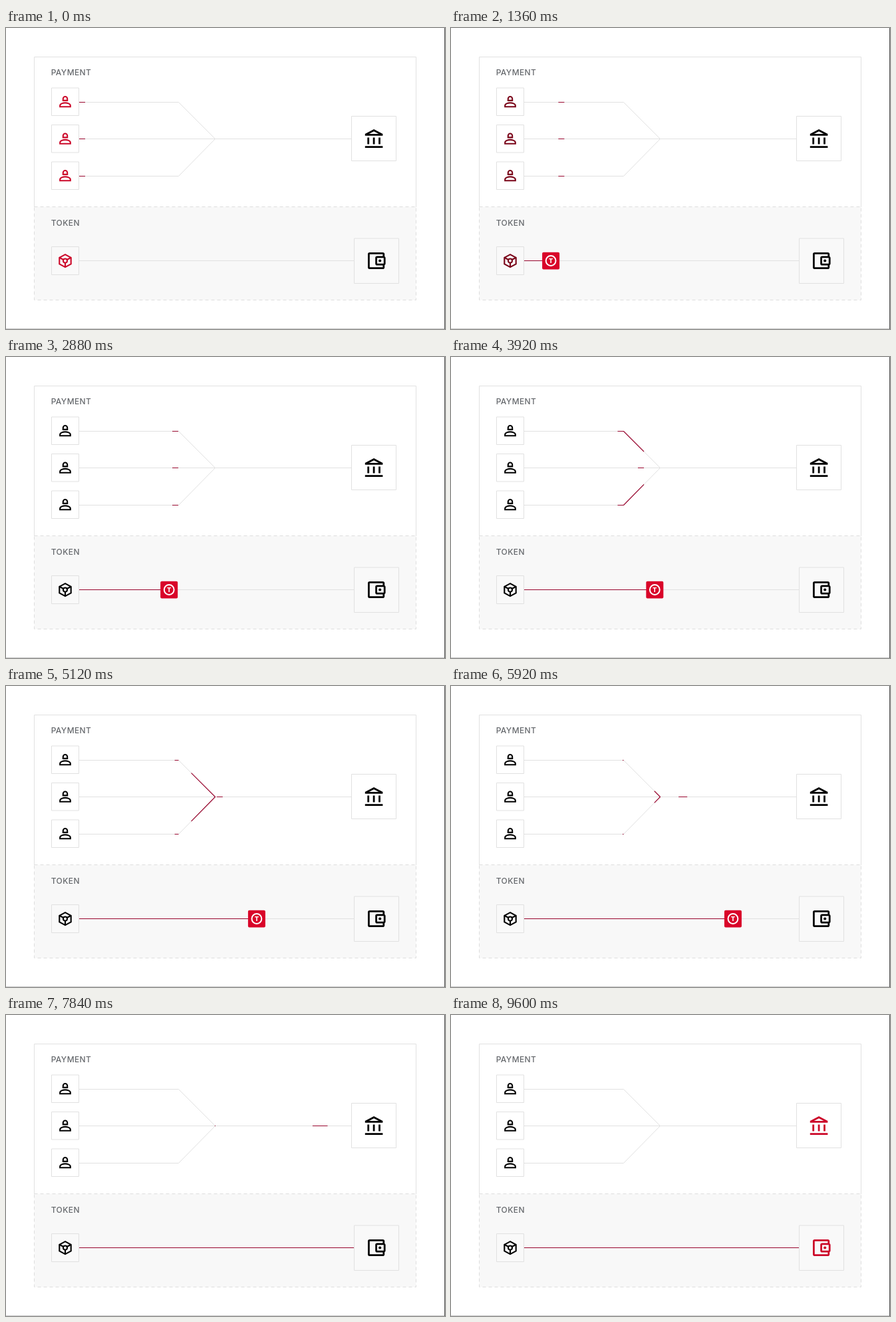
An HTML page that plays this animation: 660x452 px, repeating every 9680 ms.

```html
<!DOCTYPE html>
<html lang="en">
<head>
<meta charset="utf-8">
<title>Payment and token flow</title>
<style>
  html, body { margin: 0; width: 100%; height: 100%; overflow: hidden; background: #fff; }
  svg { display: block; }
  text { font-family: Inter, Arial, sans-serif; }
  .label { font-size: 12px; font-weight: 500; letter-spacing: .4px; fill: #66696d; }
  .wire { fill: none; stroke: #e1e1e1; }
  .box { fill: #fff; stroke: #e1e1e1; }
  .tint { fill: #f8f8f8; }
  .pulse { fill: none; stroke: #98062e; stroke-width: 1.2; }
  .outline { fill: none; stroke: currentColor; stroke-width: 2.1; }
  .solid { fill: currentColor; }
</style>
</head>
<body>
<svg width="660" height="452" viewBox="0 0 660 452">
  <defs>
    <g id="person" class="outline">
      <path d="M-3.2 -2.1V-4.8a3.2 3.2 0 0 1 6.4 0V-2.1Z"/>
      <path d="M-7.8 7.3V5.4C-7.8 2.6-3 1.4 0 1.4S7.8 2.6 7.8 5.4V7.3Z"/>
    </g>
  </defs>

  <path d="M659.5 0V452" stroke="#555"/>
  <path d="M0 451.5H659" stroke="#ccc"/>
  <path class="wire" d="M42.5 269V43.5H616.5V269"/>
  <rect class="tint" x="42.5" y="268.5" width="574" height="140" stroke="#dedede" stroke-dasharray="5 4"/>
  <text class="label" x="67.7" y="70.7">PAYMENT</text>
  <text class="label" x="67.7" y="296.7">TOKEN</text>

  <path class="wire" d="M110 111.5H259.5L314.5 166.5L259.5 222.5H110M110 166.5H519M110 349.5H523"/>
  <path id="pulses" class="pulse"/>
  <path id="trail" class="pulse"/>
  <g id="chip">
    <rect x="-13" y="-12.7" width="26" height="25.6" rx="2" fill="#d90429"/>
    <circle r="7.4" fill="none" stroke="#fff" stroke-width="2"/>
    <text y="3.5" font-size="9.5" font-weight="800" text-anchor="middle" fill="#fff">T</text>
  </g>

  <g class="box">
    <path d="M68.5 90h41v41.5h-41zM68.5 145.5h41v41.5h-41zM68.5 201h41v41.5h-41z"/>
    <path d="M519.5 132.5h67v67h-67z"/>
  </g>
  <path class="box" style="fill:#f9f9f9" d="M68.5 328.5h41v42h-41zM523.5 316h67v67.5h-67z"/>

  <g id="senders">
    <use href="#person" x="89" y="111"/>
    <use href="#person" x="89" y="166.5"/>
    <use href="#person" x="89" y="222"/>
    <g class="outline" transform="translate(89 349.5)">
      <path d="M0-9.4L8.7-4.7V4.9L0 9.6L-8.7 4.9V-4.7Z"/>
      <circle r="3"/>
      <path d="M-8.7-4.7L-2.6-1.5M8.7-4.7L2.6-1.5M0 3V9.6"/>
    </g>
  </g>
  <g id="receivers" class="solid" fill-rule="evenodd">
    <path transform="translate(537 150.6) scale(1.4)" d="M4.5 10h2v7h-2zM10.5 10h2v7h-2zM16.5 10h2v7h-2zM2 19h19v2H2zM11.5 1L2 6v2h19V6zM11.5 3.26L16.7 6H6.3z"/>
    <g transform="translate(539.8 332.7) scale(1.4)">
      <path d="M21 7.28V5a2 2 0 0 0-2-2H5a2 2 0 0 0-2 2v14a2 2 0 0 0 2 2h14a2 2 0 0 0 2-2v-2.28A2 2 0 0 0 22 15V9a2 2 0 0 0-1-1.72zM20 9v6h-7V9zM5 19V5h14v2h-6a2 2 0 0 0-2 2v6a2 2 0 0 0 2 2h6v2z"/>
      <circle cx="16" cy="12" r="1.5"/>
    </g>
  </g>
</svg>
<script>
const LOOP = 9680, START = 480, TURN = 2880, LEAVE = 4560, MERGE = 5120;
const BEND = 259.5, JOIN = 314.5, MID = 166.5;
const el = id => document.getElementById(id);
const clamp = k => Math.max(0, Math.min(1, k));
const progress = (t, from, to) => clamp((t - from) / (to - from));
const mix = (a, b, k) => a + (b - a) * k;

// Red at k = 1, black at k = 0.
const tone = k => `rgb(${204 * k},${8 * k},${41 * k})`;

// The pulse runs evenly to the bend, slows on the slope, then speeds up.
function frontX(t) {
  if (t < TURN) return mix(119, 259, progress(t, START, TURN));
  const late = Math.max(0, t - MERGE);
  return 259 + 0.0298 * (t - TURN) + 8.5e-6 * late ** 2 + 1e-12 * late ** 4 / 4;
}

// The chip moves slightly faster on its first stretch.
const chipX = t => 95 + 0.0588 * Math.max(0, t - START) + 9 * progress(t, START, TURN);

// Part of a line from x1 to x2, on a slope through (BEND, y).
const segment = (x1, x2, y, slope = 0) =>
  x2 > x1 ? `M${x1} ${y + slope * (x1 - BEND)}L${x2} ${y + slope * (x2 - BEND)}` : '';

function draw(now) {
  const t = now % LOOP;
  const front = frontX(t);
  const rear = front - 9 - Math.max(0, t - MERGE) / 200;
  const stub = mix(Math.min(rear, 250.5), BEND, progress(t, LEAVE, 6200));
  const slopeRear = BEND + 0.034 * Math.max(0, t - LEAVE);

  let d = segment(rear, front, MID);
  for (const [y, slope] of [[111.5, 1], [222.5, -56 / 55]]) {
    d += segment(stub, Math.min(front, BEND), y);
    d += segment(slopeRear, Math.min(front, JOIN), y, slope);
  }
  if (t > MERGE && t < 8560) d += segment(314, 315, MID);
  el('pulses').setAttribute('d', d);

  const x = chipX(t);
  el('chip').setAttribute('transform', `translate(${x} 349.5)`);
  el('chip').style.visibility = x < 537 ? 'visible' : 'hidden';
  el('trail').setAttribute('d', segment(110, Math.min(x, 523), 349.5));
  el('senders').style.color = tone(1 - progress(t, START, 2680));
  el('receivers').style.color = tone(progress(t, 8480, 9600));
  requestAnimationFrame(() => draw(performance.now() - start));
}
const start = performance.now();
draw(0);
</script>
</body>
</html>
```
